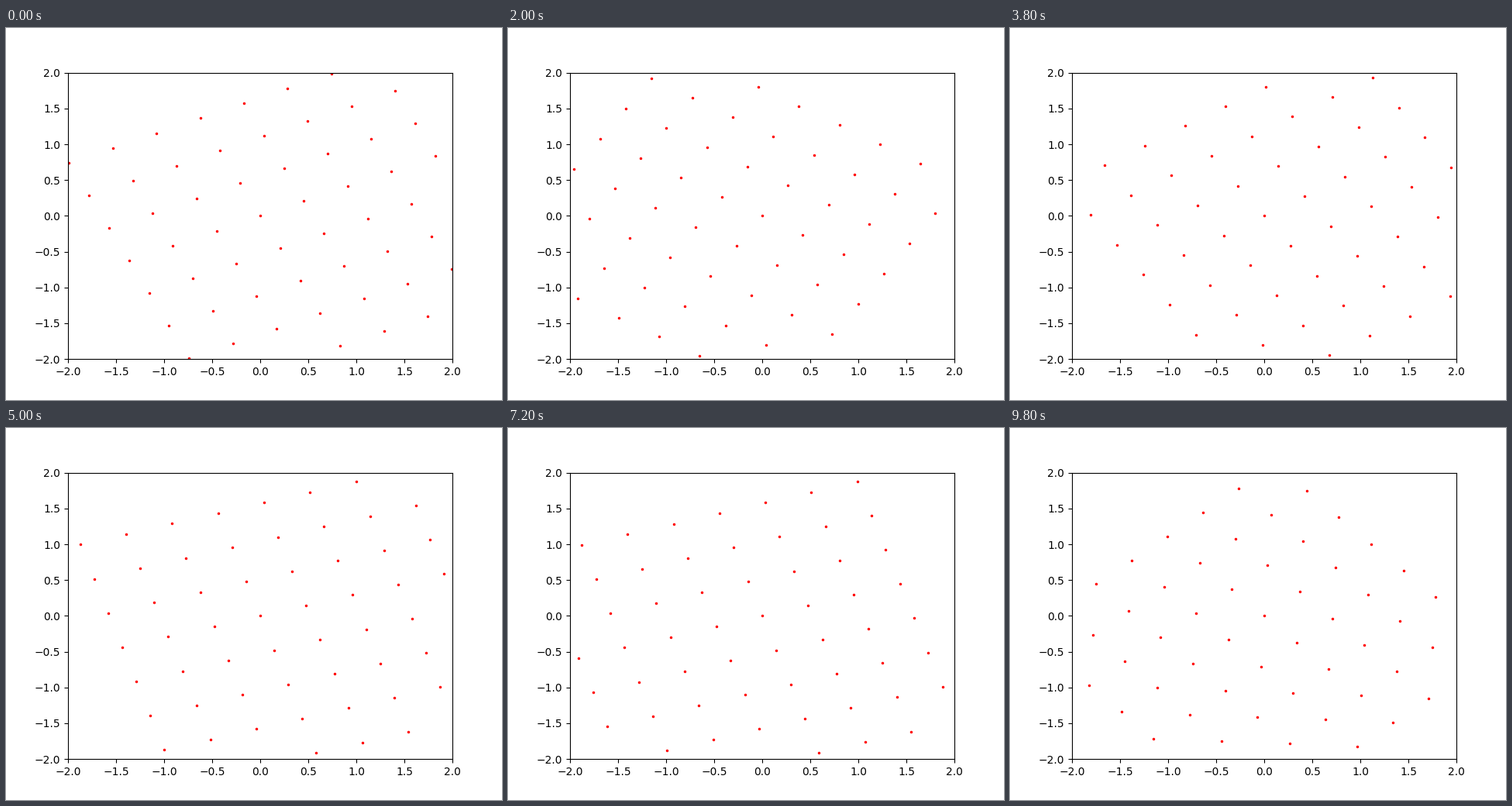
Write a matplotlib script that moves like this. It is 640 px wide and 480 px high and loops after 10 s.

```python
import numpy as np
import matplotlib.pyplot as plt
from matplotlib.animation import FuncAnimation

FRAMES = 50
INTERVAL = 200
START = 2.0  # radians; the lattice turns by one radian per frame

side = np.arange(-2, 2, 0.5)
X, Y = (g.ravel() for g in np.meshgrid(side, side))

fig, ax = plt.subplots(figsize=(6.4, 4.8), dpi=100)
ax.set_xlim(-2, 2)
ax.set_ylim(-2, 2)
dots, = ax.plot([], [], "r.", markersize=3)


def update(i):
    angle = START + i
    c, s = np.cos(angle), np.sin(angle)
    dots.set_data(c * X - s * Y, s * X + c * Y)
    return dots,


def init():
    return update(0)


anim = FuncAnimation(fig, update, frames=FRAMES, init_func=init,
                     interval=INTERVAL, repeat=True)
plt.show()
```
